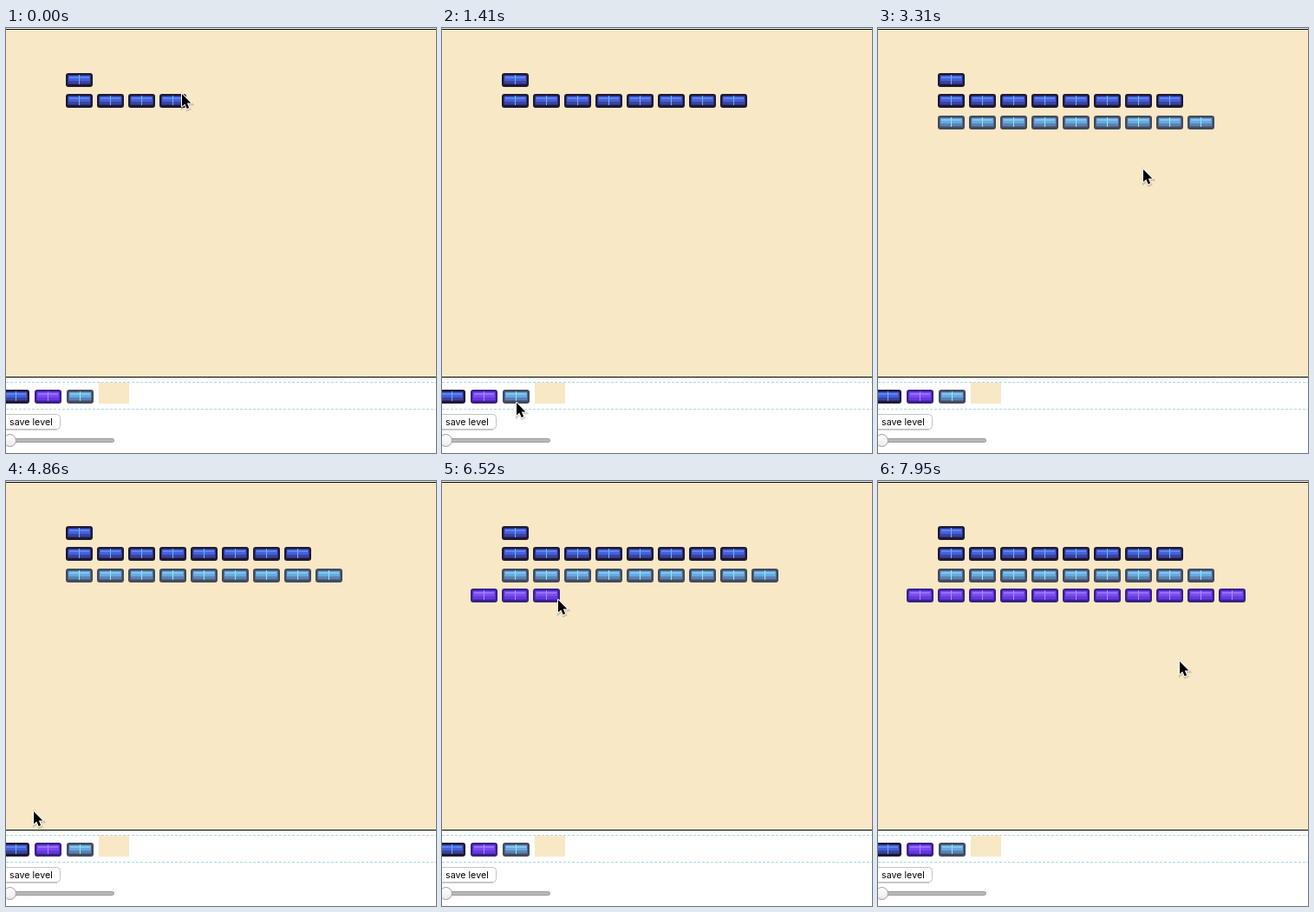
Write an HTML page that moves like this. It is 496 by 490 pixels and loops after 8 s.

```html
<!DOCTYPE html>
<html lang="en">
<head>
<meta charset="utf-8">
<title>Level editor</title>
<style>
  html, body { margin: 0; width: 100%; height: 100%; overflow: hidden; background: #fff; }
  svg { display: block; width: 496px; height: 490px; }
  text { font: 10.7px Inter, "Open Sans", sans-serif; fill: #000; }
  .dark { --edge: #1d1936; --rim: #32307a; --top: #5c83ee; --mid: #4262d8; --low: #3d429f; --seam: #69b4f2; }
  .cyan { --edge: #444a5e; --rim: #4f6687; --top: #82c4ea; --mid: #68a9e0; --low: #5a83b4; --seam: #83eef0; }
  .purple { --edge: #38208a; --rim: #5730c0; --top: #9470fa; --mid: #7a4bf4; --low: #6738dc; --seam: #a48cff; }
</style>
</head>
<body>
<svg viewBox="0 0 496 490">
  <defs>
    <linearGradient id="knob" x2="0" y2="1">
      <stop stop-color="#fff"/><stop offset="1" stop-color="#ececec"/>
    </linearGradient>
    <g id="brick">
      <rect width="31" height="16" rx="3" style="fill:var(--edge)"/>
      <rect x="2" y="2" width="27" height="11" rx="1.5" style="fill:var(--rim)"/>
      <rect x="3" y="3" width="25" height="8" style="fill:var(--mid)"/>
      <rect x="4" y="4" width="23" height="2" style="fill:var(--top)"/>
      <rect x="3" y="9" width="25" height="3" style="fill:var(--low)"/>
      <rect x="15" y="2" width="1" height="11" style="fill:var(--seam)"/>
    </g>
  </defs>

  <rect y="1" width="496" height="402" fill="#f8e8c5"/>
  <path d="M0 1.5H496M0 402.5H496" stroke="#000"/>
  <path d="M0 408.5H496M0 439.5H496" stroke="#add8e6" stroke-dasharray="3 2"/>
  <rect x="107" y="409" width="35" height="24" fill="#f8e8c5"/>
  <use href="#brick" class="dark" x="-4" y="417"/>
  <use href="#brick" class="purple" x="33" y="417"/>
  <use href="#brick" class="cyan" x="70" y="417"/>

  <rect x="-8.5" y="445.5" width="71" height="17" rx="4" fill="#fff" stroke="#c3c3c3"/>
  <path d="M0 463.3H59" stroke="#aaa" stroke-width=".7"/>
  <text x="4" y="458">save level</text>

  <rect x="-4.5" y="473.5" width="129" height="4" rx="2" fill="#b9b9b9" stroke="#9a9a9a"/>
  <circle cx="4.5" cy="475.5" r="7" fill="url(#knob)" stroke="#9c9c9c"/>

  <g id="bricks"></g>
  <g id="cursor">
    <path d="M0 0V14.5L3.3 11.4L5.7 17L8.2 16L5.8 10.5H10.4Z" transform="translate(.5 1.3)" fill="none" stroke="#000" stroke-opacity=".18" stroke-width="3"/>
    <path d="M0 0V14.5L3.3 11.4L5.7 17L8.2 16L5.8 10.5H10.4Z" fill="#000" stroke="#fff" stroke-width="2" stroke-linejoin="round" paint-order="stroke"/>
  </g>
</svg>
<script>
const LOOP = 8000, TICK = 118.75, LEAD = 17, PITCH = 36;
const layer = document.getElementById('bricks');
const cursor = document.getElementById('cursor');

// Each row: kind, left, top, count and the tick at which brick i is placed.
const rows = [
  ['dark', 69, 52, 1, () => 0],
  ['dark', 69, 76, 8, i => i < 4 ? 0 : 1 + Math.floor((i - 4) * 4 / 3)],
  ['cyan', 69, 101, 9, i => 21 + Math.floor(i / 2)],
  ['purple', 33, 124, 11, i => 53 + Math.ceil(i * .75)]
];

// Pointer positions on consecutive ticks, starting at the keyed tick.
const moves = {
  0: '203,76 229,77 262,77 296,77 322,77 342,77',
  7: '322,101 270,160 202,232 132,308 83,366 86,432 87,426',
  14: '97,403 109,352 111,292 105,232 93,172 81,132 75,116',
  21: '92,116 160,116 233,115 306,113 369,112',
  28: '306,163 256,207 203,262 152,318 108,369 76,404 57,421',
  35: '56,421',
  39: '49,412 37,398 32,381 25,350 50,294 95,236 85,202',
  46: '75,184 67,168 61,156 56,147 53,142 53,140 53,139',
  53: '55,139 90,138 134,137 192,137 244,137 298,136 348,136',
  60: '372,136 397,136 410,136 415,136',
  67: '348,208'
};

const bricks = rows.flatMap(([kind, left, top, count, placedAt]) =>
  Array.from({ length: count }, (_, i) => {
    const node = document.createElementNS('http://www.w3.org/2000/svg', 'use');
    node.setAttribute('href', '#brick');
    node.setAttribute('class', kind);
    node.setAttribute('x', left + i * PITCH);
    node.setAttribute('y', top);
    layer.append(node);
    return { node, tick: placedAt(i) };
  }));

const path = Object.entries(moves).flatMap(([start, points]) =>
  points.split(' ').map((point, i) => ({ tick: +start + i, point })));

function draw(now) {
  const tick = Math.floor((now % LOOP + LEAD) / TICK);
  for (const brick of bricks)
    brick.node.setAttribute('visibility', brick.tick <= tick ? 'visible' : 'hidden');
  const { point } = path.findLast(step => step.tick <= tick);
  cursor.setAttribute('transform', `translate(${point})`);
}

const begin = performance.now();
function frame() {
  draw(performance.now() - begin);
  requestAnimationFrame(frame);
}
frame();
</script>
</body>
</html>
```
